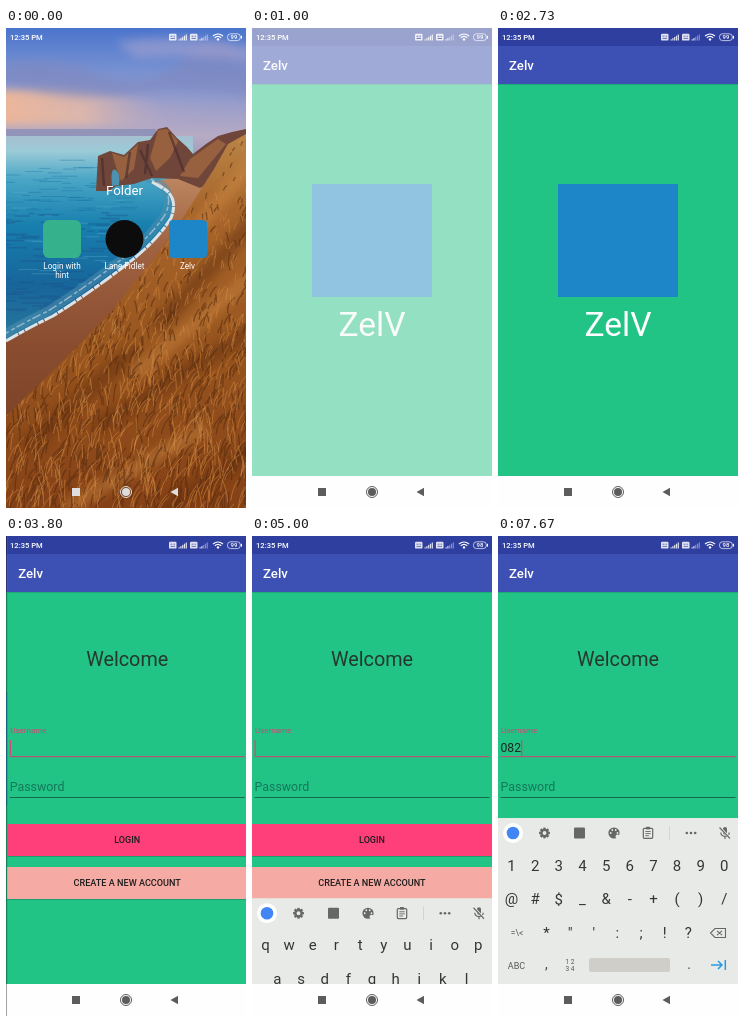
An HTML page that plays this animation: 240 px wide and 480 px high, repeating every 8000 ms.

```html
<!DOCTYPE html>
<html lang="en">
<head>
<meta charset="utf-8">
<title>App launch and login</title>
<style>
html, body { margin: 0; width: 100%; height: 100%; overflow: hidden; background: #fff; }
svg { display: block; width: 100vw; height: 100vh; font-family: Roboto, "Noto Sans", sans-serif; }
</style>
</head>
<body>
<svg id="stage" viewBox="0 0 240 480"></svg>
<script>
const LOOP = 8000;
const GREEN = '#22c486', GREY = '#666866';

const clamp = v => Math.max(0, Math.min(1, v));
const ramp = (t, a, b) => clamp((t - a) / (b - a));
const mix = (a, b, k) => a + (b - a) * k;
const sineInOut = k => (1 - Math.cos(Math.PI * k)) / 2;
const easeOut = (k, n) => 1 - (1 - k) ** n;

let seed = 7;
const rnd = () => (seed = (seed * 16807) % 2147483647) / 2147483647;

const rect = (x, y, w, h, fill, more = '') =>
  `<rect x="${x}" y="${y}" width="${w}" height="${h}" fill="${fill}" ${more}/>`;
const circle = (x, y, r, fill, more = '') =>
  `<circle cx="${x}" cy="${y}" r="${r}" fill="${fill}" ${more}/>`;
const path = (d, fill, more = '') => `<path d="${d}" fill="${fill}" ${more}/>`;
const line = (d, stroke, width = 1, more = '') =>
  `<path d="${d}" fill="none" stroke="${stroke}" stroke-width="${width}" ${more}/>`;
const text = (s, x, y, size, fill, anchor = 'middle', weight = 400, more = '') =>
  `<text x="${x}" y="${y}" font-size="${size}" fill="${fill}" text-anchor="${anchor}" font-weight="${weight}" ${more}>${s}</text>`;
const group = (id, body, more = '') => `<g id="${id}" ${more}>${body}</g>`;
const gradient = (id, stops, dir = 'x2="0" y2="1"') =>
  `<linearGradient id="${id}" ${dir}>${stops.map(([o, c, a = 1]) =>
    `<stop offset="${o}" stop-color="${c}" stop-opacity="${a}"/>`).join('')}</linearGradient>`;

function blades(count, color, width, opacity) {
  let d = '';
  for (let i = 0; i < count; i++) {
    const y = 105 + 385 * rnd() ** 0.8, x = 250 * rnd() - 5;
    const len = 3 + (y - 100) / 26 * (0.5 + rnd()), lean = len * (rnd() * 1.1 - 0.3);
    d += `M${x.toFixed(1)} ${y.toFixed(1)}q${(lean * 0.2).toFixed(1)} ${(-len * 0.6).toFixed(1)} ${lean.toFixed(1)} ${(-len).toFixed(1)}`;
  }
  return line(d, color, width, `opacity="${opacity}"`);
}

// Horizontal dashes scattered over a box, for waves and cloud streaks.
function streaks(count, x, y, w, h, color, width, opacity) {
  let d = '';
  for (let i = 0; i < count; i++)
    d += `M${(x + w * rnd()).toFixed(1)} ${(y + h * rnd()).toFixed(1)}h${(5 + 22 * rnd()).toFixed(1)}`;
  return line(d, color, width, `opacity="${opacity}"`);
}

function wallpaper() {
  const hill = 'M240 106L222 116 208 141 192 166 173 196 142 238 104 285 58 332 0 388V480H240Z';
  const foam = 'M0 313Q22 300 47 288 88 262 121 236 151 213 165 190 172 172 160 162L146 154';
  return `<defs>
    ${gradient('sky', [[0, '#4a74cc'], [0.3, '#7590d2'], [0.6, '#9c9fca'], [0.8, '#b7abc3'], [1, '#9a97b8']])}
    ${gradient('glow', [[0, '#f2b795', 0.95], [0.35, '#ecbca4', 0.75], [0.65, '#b9a8c2', 0.25], [1, '#a9a0c0', 0]], '')}
    ${gradient('sea', [[0, '#a5bfd0'], [0.07, '#9ccbd8'], [0.2, '#4aa6c5'], [0.42, '#177fae'], [0.7, '#17659a'], [1, '#2c7d9d']])}
    ${gradient('sand', [[0, '#bd8560'], [0.2, '#a06443'], [0.5, '#8a4d30'], [1, '#6f391f']])}
    ${gradient('grass', [[0, '#b98546'], [0.2, '#a8662c'], [0.55, '#99561f'], [1, '#854116']])}
    <clipPath id="hill"><path d="${hill}"/></clipPath>
    <filter id="soft" x="-30%" y="-60%" width="160%" height="220%"><feGaussianBlur stdDeviation="5"/></filter></defs>` +
    rect(0, 0, 240, 135, 'url(#sky)') +
    path('M-10 62Q60 56 130 70T250 64V98H-10Z', 'url(#glow)', 'filter="url(#soft)"') +
    path('M-10 38Q40 24 92 45T180 28 250 48V70Q180 56 120 66T-10 52Z', '#7f88bf', 'opacity=".65" filter="url(#soft)"') +
    path('M110 14Q170 4 250 20V34Q190 26 130 30Z', '#a5a3cf', 'opacity=".6" filter="url(#soft)"') +
    rect(0, 101, 150, 9, '#7a86b2', 'opacity=".6"') +
    rect(0, 108, 187, 214, 'url(#sea)') +
    streaks(60, -10, 132, 130, 55, '#0f689f', 1, 0.35) +
    streaks(90, -15, 185, 120, 105, '#1c4f8a', 1.5, 0.4) +
    streaks(35, -10, 140, 140, 120, '#5fb6cf', 1, 0.35) +
    path(foam + 'L170 149 205 150V480H0Z', 'url(#sand)') +
    line(foam, '#4e8fb0', 9, 'opacity=".55" transform="translate(-5 -5)"') +
    line(foam, '#b4cfdd', 1.5, 'opacity=".7" stroke-dasharray="9 3 4 2" transform="translate(-5 -5)"') +
    line(foam, '#dbe3e9', 3, 'stroke-dasharray="14 1 6 1"') +
    path('M90 163L92 128 104 123 118 127 132 114 144 112 152 101 161 99 171 110 181 119 187 126 200 116 212 108 226 104 240 101V135L194 160 172 151 146 150 128 156 110 158 103 163Z', '#70463a') +
    path('M106 125L118 129 132 116 128 141 115 153 110 139ZM152 102L161 101 172 113 164 130 150 143 144 130ZM184 131L212 111 220 116 192 150 174 148Z', '#a4693f', 'opacity=".75"') +
    path('M106 158Q104 139 110 142 115 147 113 157Z', '#4c91af') +
    line('M96 130L98 158M124 124L120 150M142 116L139 146M163 104L178 144M134 122L146 148', '#442a2e', 2.5, 'opacity=".6"') +
    path(hill, 'url(#grass)') +
    `<g clip-path="url(#hill)">
      <g filter="url(#soft)" opacity=".45">${line('M250 190L150 300M250 300L90 400M130 320L20 420M250 420L150 490', '#5a2a0e', 16)}${line('M250 130L170 225M250 245L130 345M200 400L60 480', '#cf8b45', 14)}</g>` +
    blades(800, '#542a10', 1.3, 0.55) + blades(700, '#c27a36', 1, 0.7) + blades(350, '#dba058', 0.7, 0.6) + '</g>';
}

function folder() {
  const label = (s, x, y) => text(s, x, y, 8.2, '#fff');
  return text('Folder', 118.5, 167, 13.3, '#fff') +
    rect(37, 192, 38, 38, '#35b28c', 'rx="6"') +
    circle(118.5, 211, 19, '#0c0c0c') +
    rect(163, 192, 38, 38, '#1c86c8', 'rx="4"') +
    label('Login with', 56, 241) + label('hint', 56, 250) +
    label('Lane Fidlet', 118.5, 241) + label('Zelv', 181.5, 241);
}

function statusBar() {
  const sim = (x, dim) => {
    let s = rect(x, 5.8, 7.5, 6.8, '#fff', 'rx="1.2" opacity=".85"') +
      line(`M${x + 1.5} 8.2h2M${x + 4.5} 8.2h1.6M${x + 1.5} 10.4h4.5`, '#4a59a8', 0.8);
    for (let i = 0; i < 5; i++)
      s += rect(x + 9.5 + i * 1.8, 11.3 - i * 1.2, 1.2, 1.2 + i * 1.2, '#fff', `opacity="${dim && i > 1 ? 0.4 : 0.85}"`);
    return s;
  };
  return text('12:35 PM', 4, 11.8, 7.6, '#fff', 'start', 500) + sim(163) + sim(184, true) +
    line('M207 8Q212 4 217 8M208.8 9.8Q212 7 215.2 9.8', '#fff', 1.2) + circle(212, 11.4, 1.2, '#fff') +
    rect(221.5, 5.8, 12.8, 6.8, 'none', 'rx="3" stroke="#fff" stroke-width=".8" opacity=".85"') +
    rect(234.8, 7.8, 1.2, 2.8, '#fff') +
    text('99', 228, 11.4, 6, '#fff', 'middle', 500, 'id="battery"');
}

const navIcons = () => rect(66, 460, 8, 8, 'currentColor') +
  circle(120, 464, 5.5, 'none', 'stroke="currentColor" stroke-width="1"') +
  circle(120, 464, 4, 'currentColor') + path('M164.5 464L172 459.8V468.2Z', 'currentColor');

const frame = () => rect(0, 0, 240, 448, GREEN) + rect(0, 0, 240, 18.5, '#2f3f9f') +
  rect(0, 56, 240, 1, '#1fab78') + rect(0, 18, 240, 38, '#3d50b3') +
  text('Zelv', 11, 42, 13.2, '#fff', 'start', 500) + rect(0, 448, 240, 32, '#fdfefd');

const splash = () => frame() + rect(60, 156, 120, 113, '#1c86c8') + text('ZelV', 120, 308, 33.5, '#fff');

const login = () => frame() +
  text('Welcome', 120, 130, 19.8, '#24382f') +
  text('Username', 3, 196.5, 8, '#d0466f', 'start') +
  rect(2.5, 220, 235, 1.2, '#b4566f') +
  text('', 2.5, 216, 12.2, '#1c2420', 'start', 400, 'id="typed"') +
  rect(2.5, 204, 1.2, 15.5, '#e0406f', 'id="cursor"') +
  text('Password', 2.5, 255, 12.4, '#14775a', 'start') +
  rect(2.5, 261, 235, 1, '#14694f') +
  rect(0, 289, 240, 32, '#1aa06e') + rect(0, 288, 240, 32, '#ff3f7a') +
  text('LOGIN', 120, 307.2, 9, '#1d1d1d', 'middle', 500) +
  rect(0, 332, 240, 32, '#1aa06e') + rect(0, 331, 240, 32, '#f5aaa3') +
  text('CREATE A NEW ACCOUNT', 120, 350.4, 9.1, '#1d1d1d', 'middle', 500);

function toolbar() {
  let teeth = '';
  for (let i = 0; i < 8; i++) teeth += rect(45.3, 291.6, 2.4, 3, GREY, `transform="rotate(${i * 45} 46.5 297)"`);
  return circle(15, 297, 10, '#fff') + circle(15, 297, 6.3, '#4285f4') +
    teeth + circle(46.5, 297, 3.1, 'none', `stroke="${GREY}" stroke-width="2.2"`) +
    rect(76, 291.5, 11, 11, GREY, 'rx="1"') +
    circle(116, 297, 5.6, GREY) + circle(119.5, 300.6, 2, '#e8eae7') +
    [[112.7, 297], [114.3, 294], [117.7, 294], [119.5, 297]].map(([x, y]) => circle(x, y, 0.9, '#e8eae7')).join('') +
    rect(145.3, 292.3, 9.4, 10, 'none', `stroke="${GREY}" stroke-width="1.2" rx="1"`) +
    rect(148, 290.8, 4, 2.6, GREY) + line('M147.3 295.5h5.4M147.3 297.6h5.4M147.3 299.7h3.6', GREY, 0.9) +
    rect(171, 290, 0.8, 14, '#cdd0cd') +
    [188.8, 193, 197.2].map(x => circle(x, 297, 1.3, GREY)).join('') +
    rect(225, 291, 4, 7.5, GREY, 'rx="2"') +
    line('M222.8 296.5Q223 300.3 227 300.3T231.2 296.5M227 300.3V303', GREY, 1.2) +
    line('M222 291.5L232.5 302.5', '#e8eae7', 2.2) + line('M221.5 291.5L232 302.5', GREY, 1.1);
}

const esc = c => c.replace(/&/, '&amp;').replace(/</, '&lt;');
const keyRow = (chars, x, y) => [...chars].map((c, i) =>
  text(esc(c), (x + i * 23.65).toFixed(1), y, 15, '#333633')).join('');

function keyboard() {
  const small = (s, x, y, size = 9) => text(s, x, y, size, '#555855');
  const letters = keyRow('qwertyuiop', 13.5, 334) + keyRow('asdfghjkl', 25.4, 368) + keyRow('zxcvbnm', 48.5, 402) +
    line('M18.5 391.5L13.5 397H16V401.5H21V397H23.5Z', GREY, 1.2) + small('?123', 18.5, 432.5) +
    circle(72, 429, 5, 'none', `stroke="${GREY}" stroke-width="1.1"`) +
    circle(70.2, 427.8, 0.8, GREY) + circle(73.8, 427.8, 0.8, GREY) + line('M69.5 430.5Q72 433 74.5 430.5', GREY);
  const symbols = keyRow('1234567890', 13.5, 334.5) + keyRow('@#$_&-+()/', 13.5, 368) + keyRow('*"\':;!?', 48.5, 402) +
    small('=\\&lt;', 19, 399.5, 8.5) + small('ABC', 18.5, 432.5) +
    small('1 2', 72, 427.5, 6.5) + small('3 4', 72, 435, 6.5);
  return rect(0, 282, 240, 198, '#e8eae7') + toolbar() +
    rect(0, 314, 24, 30, '#cdd0cd', 'rx="4" id="press"') +
    rect(91, 422, 81, 14, '#d0cec8', 'rx="2"') +
    text(',', 48.5, 433, 14, '#444744') + text('.', 191, 433, 14, '#444744') +
    line('M217 392.5H227.5V401.5H217L212.5 397ZM219 394.8L224 399.2M224 394.8L219 399.2', GREY, 1.1) +
    line('M213 429H224M220 425L224 429 220 433M227.3 424V434', '#2b9be0', 1.5) +
    group('letters', letters) + group('symbols', symbols);
}

document.getElementById('stage').innerHTML =
  group('home', wallpaper() + group('folder', folder())) +
  group('window', rect(0, 0, 240, 480, '#f7faf8') + rect(0, 448, 240, 32, '#fff') +
    group('splash', splash()) + rect(0, 0, 240, 480, '#1c86c8', 'id="tint"') +
    rect(0, 0, 240, 480, '#000', 'id="dim"')) +
  group('login', login() + group('keyboard', keyboard()) + rect(0, 448, 240, 32, '#fdfefd')) +
  group('status', statusBar()) + group('nav', navIcons());

const el = {};
document.querySelectorAll('#stage [id]').forEach(n => el[n.id] = n);
const set = (id, name, value) => el[id].setAttribute(name, value);
const show = (id, on) => set(id, 'visibility', on ? 'inherit' : 'hidden');

// Each entry: [from, to, x, y] of a pressed key.
const PRESSES = [[5600, 5730, 6, 414], [6270, 6330, 214, 314], [7600, 7670, 25, 314]];
// Times at which the text cursor is visible.
const CURSOR = [[3730, 4230], [4730, 5230], [5730, 6800], [6870, 7330], [7600, 8000]];
const within = t => ([a, b]) => t >= a && t < b;

function draw(t) {
  show('home', t < 967);
  set('folder', 'opacity', 1 - ramp(t, 330, 580));

  const p = sineInOut(ramp(t, 400, 967));
  const x = mix(163, 0, p), y = mix(192, 0, p);
  const w = mix(200, 240, p) - x, h = mix(230, 480, p) - y;
  const slide = easeOut(ramp(t, 3050, 4200), 5);
  set('window', 'transform', `translate(${x - 60 * slide} ${y}) scale(${w / 240} ${h / 480})`);
  set('window', 'opacity', ramp(t, 400, 500));
  set('tint', 'opacity', 1 - ramp(t, 430, 620));
  set('splash', 'opacity', ramp(t, 890, 1130));
  set('dim', 'opacity', 0.35 * slide);

  show('login', t >= 3050);
  set('login', 'transform', `translate(${240 * (1 - slide)} 0)`);

  const rise = easeOut(ramp(t, 4890, 5330), 2.5);
  show('keyboard', rise > 0);
  set('keyboard', 'transform', `translate(0 ${166 * (1 - rise)})`);
  show('letters', rise > 0 && t < 5670);
  show('symbols', t >= 5670);
  const press = PRESSES.find(within(t));
  show('press', !!press);
  if (press) { set('press', 'x', press[2]); set('press', 'y', press[3]); }

  const count = [6270, 6870, 7600].filter(at => t >= at).length;
  el.typed.textContent = '082'.slice(0, count);
  set('cursor', 'x', 2.5 + 6.85 * count);
  show('cursor', CURSOR.some(within(t)));
  el.battery.textContent = t < 4730 ? '99' : '98';

  const k = ramp(t, 500, 900), c = Math.round(mix(222, 92, k));
  set('nav', 'color', `rgb(${c},${c},${c})`);
}

const start = performance.now();
(function tick() {
  draw((performance.now() - start) % LOOP);
  requestAnimationFrame(tick);
})();
</script>
</body>
</html>
```
